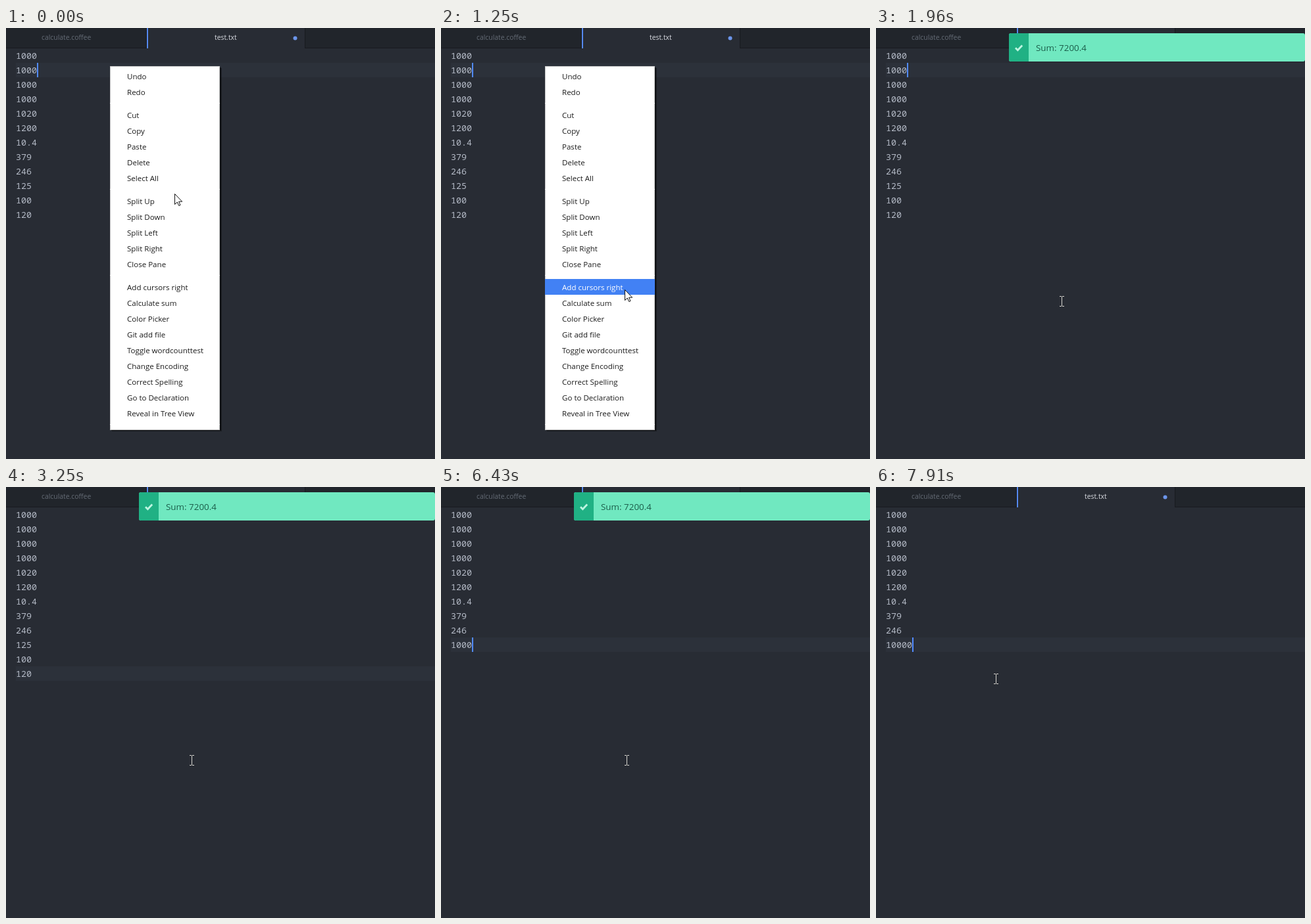
Animation of 652 by 656 pixels, one loop 7990 ms. Source, as an HTML page:

```html
<!DOCTYPE html>
<html lang="en">
<head>
<meta charset="utf-8">
<title>Calculate sum</title>
<style>
  html, body { margin: 0; width: 100%; height: 100%; overflow: hidden; background: #282c34; }
  svg { display: block; }
  text { white-space: pre; font-family: "Open Sans", "Noto Sans", sans-serif; }
  rect { shape-rendering: crispEdges; }
  .tab { font-size: 10.4px; }
  .code { font: 13.333px "Noto Sans Mono", monospace; fill: #b4bac6; }
  .item { font-size: 11.55px; fill: #1c1c1c; }
  .item.on { fill: #fff; }
  .toast { font-size: 13.4px; fill: #1b5e4a; }
</style>
</head>
<body>
<svg id="stage" width="652" height="656" viewBox="0 0 652 656"></svg>
<script>
const LOOP = 7990, ROW = 22, TOP = 31, LEFT = 15, CHAR = 8;
const stage = document.getElementById('stage');

function add(parent, tag, attrs, content) {
  const el = document.createElementNS('http://www.w3.org/2000/svg', tag);
  for (const k in attrs) el.setAttribute(k, attrs[k]);
  if (content !== undefined) el.textContent = content;
  parent.appendChild(el);
  return el;
}
const box = (parent, x, y, width, height, fill) => add(parent, 'rect', { x, y, width, height, fill });
const label = (parent, x, y, cls, str, fill) =>
  add(parent, 'text', fill ? { x, y, class: cls, fill } : { x, y, class: cls }, str);
const group = () => add(stage, 'g', {});
const show = (el, on) => el.setAttribute('visibility', on ? 'visible' : 'hidden');
const move = (el, x, y) => el.setAttribute('transform', `translate(${x} ${y})`);

// Tabs
box(stage, 0, 0, 652, 30, '#21252b');
box(stage, 0, 30, 652, 1, '#181a1f');
box(stage, 213, 0, 1, 31, '#181a1f');
box(stage, 214, 0, 240, 31, '#282c34');
box(stage, 454, 0, 1, 31, '#181a1f');
box(stage, 214, 0, 2, 31, '#568af2');
label(stage, 54, 18, 'tab', 'calculate.coffee', '#646b75');
label(stage, 317, 18, 'tab', 'test.txt', '#d7dae0');
add(stage, 'circle', { cx: 439.5, cy: 15.5, r: 3, fill: '#6c95eb' });

// Editor
const head = ['1000', '1000', '1000', '1000', '1020', '1200', '10.4', '379', '246'];
const activeLine = box(stage, LEFT, 0, 652 - LEFT, ROW, '#2c313a');
const codeRows = Array.from({ length: 12 }, (_, i) => label(stage, LEFT, TOP + i * ROW + 16, 'code', ''));
const caret = box(stage, 0, 0, 2, ROW, '#528bff');

// Lines after the head, separated by blanks
const edits = [
  [0, '125 100 120'], [3710, '125 100 12'], [3900, '125 100 1'], [4070, '125 100 '],
  [4250, '125 100'], [4350, '125 10'], [4520, '125 1'], [4700, '125 '], [4800, '125'],
  [4970, '12'], [5160, '1'], [5240, ''], [5890, '1'], [6160, '10'], [6260, '100'],
  [6430, '1000'], [6620, '10000']
];
const caretOff = [[1780, 1960], [2330, 2710], [3250, 3710], [5810, 5890], [7450, 7820]];
const JUMP_TO_END = 2800;

// Context menu
const MENU_CLOSE = 1700;
const menu = group();
box(menu, 161, 61, 167, 553, 'rgba(0,0,0,.3)');
box(menu, 160, 60, 167, 553, 'rgba(0,0,0,.45)');
box(menu, 158, 58, 167, 554, '#c9c9c9');
box(menu, 159, 59, 165, 552, '#fff');
const hover = box(menu, 158, 0, 167, 24, '#4281f4');
const items = [];
let menuY = 61;
for (const section of [
  ['Undo', 'Redo'],
  ['Cut', 'Copy', 'Paste', 'Delete', 'Select All'],
  ['Split Up', 'Split Down', 'Split Left', 'Split Right', 'Close Pane'],
  ['Add cursors right', 'Calculate sum', 'Color Picker', 'Git add file', 'Toggle wordcounttest',
    'Change Encoding', 'Correct Spelling', 'Go to Declaration', 'Reveal in Tree View']
]) {
  for (const name of section) {
    items.push({ y: menuY, el: label(menu, 184, menuY + 17, 'item', name) });
    menuY += 24;
  }
  box(menu, 158, menuY + 5, 167, 1, '#fff');
  menuY += 11;
}

// Notification
const toast = group();
add(toast, 'path', { d: 'M205 8H649a3 3 0 0 1 3 3V48a3 3 0 0 1-3 3H205a3 3 0 0 1-3-3V11a3 3 0 0 1 3-3z', fill: '#70e8c0' });
add(toast, 'path', { d: 'M205 8H232V51H205a3 3 0 0 1-3-3V11a3 3 0 0 1 3-3z', fill: '#20b184' });
add(toast, 'path', { d: 'M212 30.3l3.4 3.4 6.8-7.2', fill: 'none', stroke: '#bdf5e1', 'stroke-width': 2.8 });
label(toast, 243, 35, 'toast', 'Sum: 7200.4');
const toastSteps = [[0, 0], [1780, .35], [1870, .8], [1960, 1], [6710, .75], [6790, .3], [6880, 0]];

// Pointers
const arrow = add(stage, 'path', {
  d: 'M.5.5V16.5L4.2 13 6.8 18.5 9 17.5 6.6 12.2H11.7z', fill: '#fff', stroke: '#111', 'stroke-width': 1
});
const beam = group();
const beamColor = '#d8d6d0';
box(beam, 0, -7, 1, 14, beamColor);
for (const y of [-8, 7]) {
  box(beam, -3, y, 3, 1, beamColor);
  box(beam, 1, y, 3, 1, beamColor);
}
const path = [[0, 256, 252], [360, 263, 300], [710, 271, 341], [880, 273, 364], [1420, 282, 415]];
const beamSteps = [[0, [282, 416]], [7820, [222, 342]], [7910, [182, 292]]];

const stepAt = (table, t) => table.filter(s => s[0] <= t).pop()[1];

function arrowAt(t) {
  if (t < 90) t = 0;
  else if (t < 880) t = 90 + Math.floor((t - 90) / 77.5) * 77.5;
  else t = 880 + Math.floor((t - 880) / 90) * 90;
  const i = path.findIndex(p => p[0] > t);
  if (i < 0) return path[path.length - 1].slice(1);
  const a = path[i - 1], b = path[i], k = (t - a[0]) / (b[0] - a[0]);
  return [1, 2].map(n => Math.round(a[n] + (b[n] - a[n]) * k));
}

function drawEditor(t) {
  const lines = head.concat(stepAt(edits, t).split(' '));
  const row = t < JUMP_TO_END ? 1 : lines.length - 1;
  const y = TOP + row * ROW;
  codeRows.forEach((el, i) => { el.textContent = lines[i] || ''; });
  activeLine.setAttribute('y', y);
  caret.setAttribute('y', y);
  caret.setAttribute('x', LEFT + lines[row].length * CHAR);
  show(caret, !caretOff.some(([from, to]) => t >= from && t < to));
}

function drawMenu(t) {
  const open = t < MENU_CLOSE;
  show(menu, open);
  show(arrow, open);
  show(beam, !open);
  move(beam, ...stepAt(beamSteps, t));
  const [x, y] = arrowAt(t);
  move(arrow, x, y);
  const active = open && t >= 90 ? items.find(it => y >= it.y && y < it.y + 24) : null;
  show(hover, !!active);
  if (active) hover.setAttribute('y', active.y);
  for (const it of items) it.el.classList.toggle('on', it === active);
}

function drawToast(t) {
  const o = stepAt(toastSteps, t);
  const s = t < 6000 ? 1 : .8 + .2 * o;
  toast.setAttribute('opacity', o);
  toast.setAttribute('transform', `translate(427 29.5) scale(${s}) translate(-427 -29.5)`);
}

function draw() {
  const t = performance.now() % LOOP;
  drawEditor(t);
  drawMenu(t);
  drawToast(t);
  requestAnimationFrame(draw);
}
draw();
</script>
</body>
</html>
```
